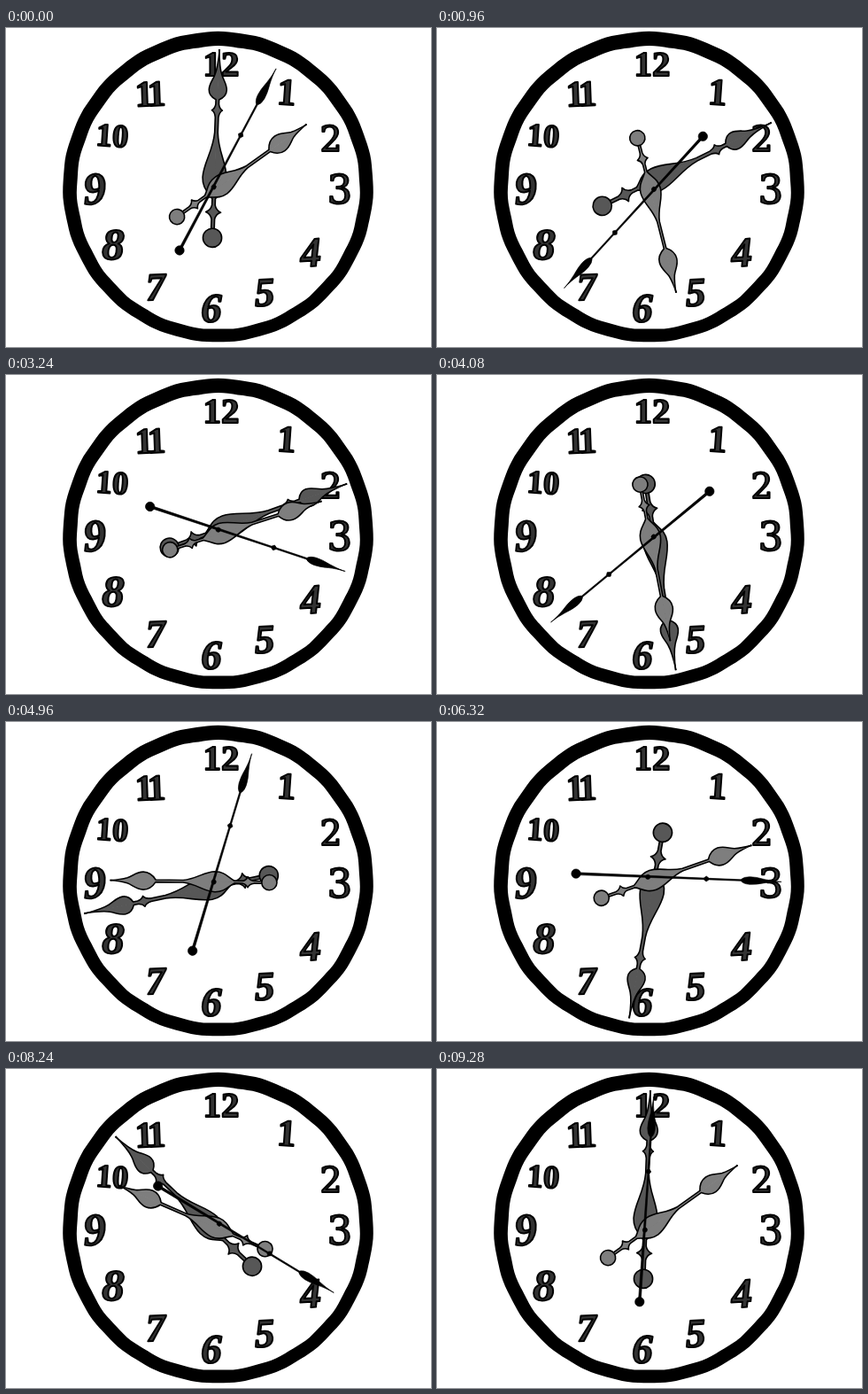
Write an HTML page that moves like this. It is 480x360 px and loops after 9.32 s.

```html
<!DOCTYPE html>
<html lang="en">
<head>
<meta charset="utf-8">
<title>Spinning clock</title>
<style>
  html, body { margin: 0; width: 100%; height: 100%; overflow: hidden; background: #fff; }
  svg { display: block; width: 100%; height: 100%; }
  text {
    font-family: "Liberation Serif", serif;
    font-weight: 700;
    text-anchor: middle;
    fill: #333;
    stroke: #000;
    stroke-width: 2;
    stroke-linejoin: round;
  }
  .slanted { font-style: italic; }
  .wide { font-family: "DejaVu Serif", serif; font-weight: 400; }
  .hand { stroke: #000; stroke-width: 1.6; stroke-linejoin: round; }
  #minute { fill: #575757; }
  #hour { fill: #7e7e7e; }
  #second { fill: #000; stroke-width: .6; }
</style>
</head>
<body>
<svg viewBox="0 0 480 360">
  <defs>
    <!-- right halves of the hands, pointing up from the pivot -->
    <path id="minuteHalf" d="M-.3-156C.5-142 2-132 4-127C6-121 10-117 10-110C10-104 6-101 1.800-99V-94Q2.500-89 6-87Q2.500-85 1.800-79V-62C3-40 13-28 13.500-11C13.500 2 6 6 1.800 13V20Q3 26 8.500 28Q3 30 1.800 36V50H-.3"/>
    <path id="hourHalf" d="M-.3-122.500C.5-114 1.500-108 3-103C5-97 10-93 10-85C10-78 6-74 1.300-71V-40C3-24 11-17 11.500-4C11.500 7 5 11 1.300 18V27Q2 31 6 33Q2 35 1.300 40V50H-.3"/>
    <path id="secondHalf" d="M-.3-149Q.5-137 2-130Q4.500-120 4.300-113Q4-106 .8-103V-67L3-64L.8-61L1.400 82H-.3"/>
  </defs>
  <path id="rim"/>
  <path id="face" fill="#fff"/>
  <g id="numerals"></g>
  <g id="minute" class="hand"></g>
  <g id="hour" class="hand"></g>
  <g id="second" class="hand"></g>
</svg>
<script>
const SVG = "http://www.w3.org/2000/svg";
const byId = id => document.getElementById(id);

function add(parent, name, attrs) {
  const node = document.createElementNS(SVG, name);
  for (const key in attrs) node.setAttribute(key, attrs[key]);
  return parent.appendChild(node);
}

// A slightly uneven, hand-cut circle.
function roughCircle(cx, cy, radius, wobble) {
  const points = [];
  for (let deg = 0; deg < 360; deg += 2) {
    const a = deg * Math.PI / 180;
    const r = radius + wobble * Math.sin(23 * a);
    points.push((cx + r * Math.cos(a)).toFixed(1) + " " + (cy + r * Math.sin(a)).toFixed(1));
  }
  return "M" + points.join("L") + "Z";
}
byId("rim").setAttribute("d", roughCircle(239.5, 179.3, 175.2, .3));
byId("face").setAttribute("d", roughCircle(239.8, 180.2, 159.8, .4));

// label, centre x, centre y, height, tilt, lettering
const numerals = [
  ["12", 243, 40, 30, 0, ""], ["1", 317, 72, 31, 4, ""], ["2", 367, 124, 31, 0, "wide"],
  ["3", 377, 181, 35, 0, "wide"], ["4", 344, 253, 34, -4, "slanted"], ["5", 292, 298, 33, -3, "slanted"],
  ["6", 232, 316, 34, 0, "slanted"], ["7", 169, 292, 32, -2, "slanted"], ["8", 121, 243, 37, 0, "slanted"],
  ["9", 100, 181, 37, -4, "slanted"], ["10", 120, 121, 27, 4, ""], ["11", 163, 74, 30, -2, ""]
];
for (const [label, x, y, height, tilt, lettering] of numerals) {
  const capHeight = lettering === "wide" ? .74 : .685;
  const size = (height - 2) / capHeight;
  const spacing = label === "11" ? -.1 * size : 0;
  add(byId("numerals"), "text", {
    x: spacing / 2, y: height / 2 - 1, "font-size": size, "letter-spacing": spacing,
    class: lettering, transform: `translate(${x} ${y}) rotate(${tilt})`
  }).textContent = label;
}

// Each hand's axis runs beside the point it turns around.
function makeHand(id, offset, tailY, tailRadius) {
  const hand = byId(id);
  const body = add(hand, "g", { transform: `translate(${offset} 0)` });
  add(body, "use", { href: `#${id}Half` });
  add(body, "use", { href: `#${id}Half`, transform: "scale(-1 1)" });
  add(body, "circle", { cy: tailY, r: tailRadius });
  return angle => hand.setAttribute("transform", `translate(240 180) rotate(${angle})`);
}
const turnMinute = makeHand("minute", -4.85, 57, 10.6);
const turnHour = makeHand("hour", -.3, 57.4, 8.6);
const turnSecond = makeHand("second", -5.55, 83.3, 5.2);
add(byId("second"), "circle", { cx: -5, cy: 2, r: 2.6 });

const LOOP = 9320, TICK = 40;

function draw() {
  const tick = Math.floor(performance.now() % LOOP / TICK);
  // 24 poses per second shown on a 25 per second clock: one repeat in every 25.
  const pose = tick - Math.floor((tick + 13) / 25);
  turnMinute(2.15 - Math.min(pose, 222) * 2880 / 222);
  turnHour(54.5 + pose * 1080 / 223);
  turnSecond(28 + pose * 5400 / 224);
  requestAnimationFrame(draw);
}
draw();
</script>
</body>
</html>
```
